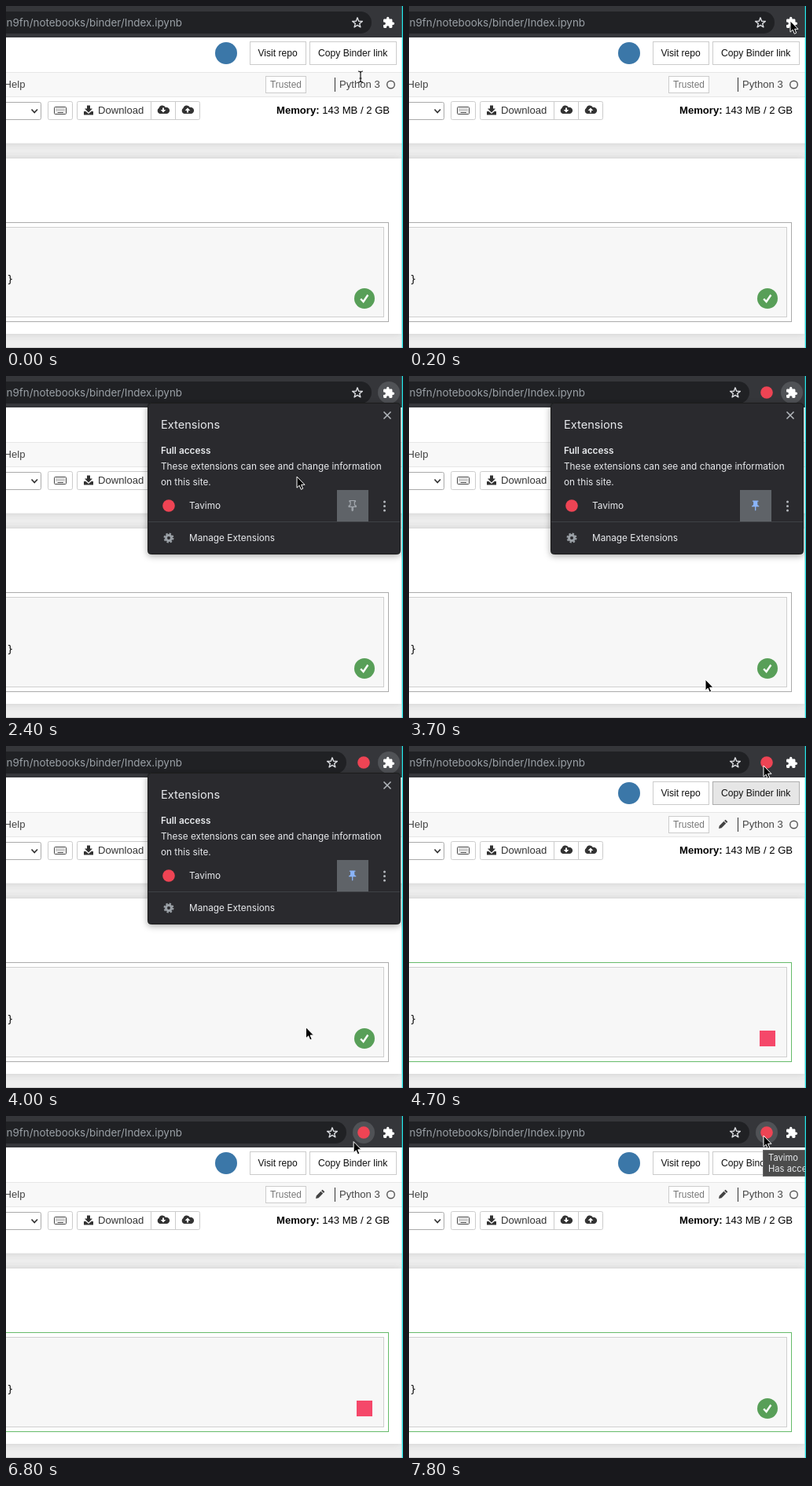
Animation, 505 px wide and 435 px high, one loop 8000 ms. Source, as an HTML page:

```html
<!DOCTYPE html>
<html lang="en">
<head>
<meta charset="utf-8">
<title>Pinning a browser extension</title>
<style>
  html, body { margin: 0; width: 100%; height: 100%; overflow: hidden; background: #fff; }
  svg { display: block; width: 505px; height: 435px; }
  text { font-family: "Liberation Sans", Arial, sans-serif; font-size: 13.1px; fill: #111; white-space: pre; }
  .ui { font-family: Inter, sans-serif; font-size: 11.8px; fill: #e8eaed; }
  .btn { fill: #fff; stroke: #ccc; }
  .hover { fill: #e6e6e6; stroke: #adadad; }
</style>
</head>
<body>
<svg viewBox="0 0 505 435" xmlns="http://www.w3.org/2000/svg">
  <defs>
    <filter id="soft" x="-20%" y="-20%" width="140%" height="150%">
      <feDropShadow dx="0" dy="2" stdDeviation="4" flood-color="#000" flood-opacity=".35"/>
    </filter>
    <filter id="glow" x="-5%" y="-10%" width="110%" height="120%">
      <feDropShadow dx="0" dy="0" stdDeviation="5" flood-color="#575757" flood-opacity=".24"/>
    </filter>
    <path id="cloud" d="M-4.5 5A4 4 0 0 1-5.5-2.2A4.6 4.6 0 0 1 3-3A3.7 3.7 0 0 1 5 5Z"/>
  </defs>

  <!-- page -->
  <rect width="505" height="435" fill="#eee"/>
  <rect x="-30" y="194" width="533" height="223" fill="#fff" filter="url(#glow)"/>
  <rect x="-30" y="30" width="570" height="144.500" fill="#fff" filter="url(#glow)"/>
  <path d="M0 434.500H505" stroke="#ccc"/>

  <circle cx="280" cy="60" r="14" fill="#3b77a8"/>
  <rect class="btn" x="310.500" y="45.500" width="71" height="29"/>
  <text x="320.500" y="64" style="font-size:12.1px">Visit repo</text>
  <rect id="copy" class="btn" x="386.500" y="45.500" width="110" height="29"/>
  <text x="397" y="64" style="font-size:12.150px">Copy Binder link</text>

  <rect x="-2" y="84.500" width="510" height="31" fill="#f8f8f8" stroke="#e7e7e7"/>
  <text x="-2.500" y="104" style="fill:#444">Help</text>
  <rect x="330.500" y="89.500" width="51" height="21" fill="#fff" stroke="#ccc"/>
  <text x="336" y="104" style="font-size:11.9px;fill:#777">Trusted</text>
  <g id="pencil" transform="translate(399 100) rotate(45)" fill="#444">
    <path d="M-2-4H2V4L0 7L-2 4ZM-2-5V-6.500Q-2-7-1.500-7H1.500Q2-7 2-6.500V-5Z"/>
  </g>
  <path d="M418.500 91V109" stroke="#333"/>
  <text x="424" y="104" style="fill:#444">Python 3</text>
  <circle cx="489.500" cy="100" r="4.800" fill="none" stroke="#555" stroke-width="1.400"/>

  <rect x="-10" y="122.500" width="54.500" height="22" rx="2" fill="#fff" stroke="#aaa"/>
  <path d="M32.500 131.500L36.200 135.500L40 131.500" fill="none" stroke="#333" stroke-width="1.700"/>
  <g class="btn">
    <rect x="53.500" y="121.500" width="31" height="23" rx="2"/>
    <rect x="90.500" y="121.500" width="156" height="23" rx="2"/>
    <path d="M184.500 122V144M215.500 122V144"/>
  </g>
  <g fill="none" stroke="#444">
    <rect x="61.500" y="128.500" width="15" height="9" rx="1"/>
    <path d="M63.500 131H75M63.500 133H75" stroke-dasharray="1 1"/>
    <path d="M65.500 135.500H73"/>
  </g>
  <g fill="#333">
    <path d="M103 126.500H107V130.500H110L105 135.500L100 130.500H103ZM99 134H101.500L105 137L108.500 134H111V138.500H99Z"/>
    <use href="#cloud" x="200" y="132"/>
    <use href="#cloud" x="231" y="132"/>
    <path d="M199 129.500H201V132H203.300L200 135.500L196.700 132H199ZM230 135.500H232V133H234.300L231 129.500L227.700 133H230Z" fill="#fff"/>
  </g>
  <text x="117" y="137" style="fill:#333">Download</text>
  <text x="344" y="137" style="fill:#000"><tspan font-weight="bold">Memory:</tspan> 143 MB / 2 GB</text>

  <rect id="cell" x="-6" y="275.500" width="492.500" height="126" fill="#fff"/>
  <rect x="-6" y="281.500" width="486.500" height="114" fill="#f7f7f7" stroke="#cfcfcf"/>
  <text x="1.500" y="352" style="font-family:'DejaVu Sans Mono',monospace;font-size:12.600px;fill:#000">}</text>
  <g id="done">
    <circle cx="456" cy="372" r="13" fill="#589f58"/>
    <path d="M451.200 372.500L454.600 376L460.400 367.500" fill="none" stroke="#fff" stroke-width="2.400"/>
  </g>
  <rect id="spin" x="-10" y="-10" width="20" height="20" fill="#f5486a"/>

  <!-- browser bar -->
  <rect width="505" height="40" fill="#35363a"/>
  <rect id="pill" x="-40" y="7" height="28" rx="14" fill="#202124"/>
  <text class="ui" x="224" y="26" text-anchor="end" style="font-size:13.400px;fill:#9aa0a6">n9fn/notebooks/binder/Index.ipynb</text>
  <path id="star" fill="none" stroke="#dadce0" stroke-width="1.400" stroke-linejoin="round"/>
  <circle id="halo" cx="487" cy="21" r="14" fill="#505256"/>
  <path transform="translate(478.700 13.200) scale(.67)" fill="#fff" d="M20.500 11H19V7c0-1.100-.9-2-2-2h-4V3.500a2.500 2.500 0 0 0-5 0V5H4c-1.100 0-2 .9-2 2v3.800h1.500a2.700 2.700 0 0 1 0 5.400H2V20c0 1.100.9 2 2 2h3.800v-1.500a2.700 2.700 0 0 1 5.400 0V22H17c1.100 0 2-.9 2-2v-4h1.500a2.500 2.500 0 0 0 0-5z"/>
  <circle id="ring" cx="455" cy="21" r="14" fill="#505256"/>
  <circle id="badge" cx="455" cy="21" r="7.800" fill="#ee4454"/>

  <!-- extensions menu -->
  <g id="menu">
    <rect x="180.500" y="34.500" width="321" height="192" rx="4" fill="#292a2d" stroke="#1c1d1f" filter="url(#soft)"/>
    <text class="ui" x="197" y="67" style="font-size:14.600px">Extensions</text>
    <path d="M480.500 45.500L489.500 54.500M489.500 45.500L480.500 54.500" stroke="#b5b9be" stroke-width="1.500"/>
    <text class="ui" x="197" y="99" font-weight="600">Full access</text>
    <text class="ui" x="197" y="119">These extensions can see and change information</text>
    <text class="ui" x="197" y="139">on this site.</text>
    <circle cx="207" cy="165" r="7.800" fill="#ee4454"/>
    <text class="ui" x="233" y="169">Tavimo</text>
    <rect id="pinBox" x="421" y="145" width="40" height="40" fill="#5f6368"/>
    <path id="pin" transform="translate(432.900 157.200) scale(.65)" stroke-width="1.800" d="M16 9V4h1a1 1 0 0 0 0-2H7a1 1 0 0 0 0 2h1v5c0 1.700-1.300 3-3 3v2h6v7l1 1 1-1v-7h6v-2c-1.700 0-3-1.300-3-3z"/>
    <g fill="#b5b9be">
      <circle cx="481.500" cy="160" r="1.500"/><circle cx="481.500" cy="165.500" r="1.500"/><circle cx="481.500" cy="171" r="1.500"/>
    </g>
    <path d="M181 185.500H501" stroke="#3f4145"/>
    <g fill="none" stroke="#9aa0a6">
      <circle cx="207" cy="206" r="3.500" stroke-width="3"/>
      <circle cx="207" cy="206" r="5.500" stroke-width="2" stroke-dasharray="2.320 2"/>
    </g>
    <text class="ui" x="233" y="210">Manage Extensions</text>
  </g>

  <g id="tip">
    <rect x="450.500" y="43.500" width="70" height="33" fill="#4b4b4b" stroke="#696969"/>
    <text class="ui" x="457" y="57" style="font-size:11.200px">Tavimo</text>
    <text class="ui" x="457" y="71" style="font-size:11.200px">Has access to this site</text>
  </g>
  <rect x="503.700" width="1.300" height="435" fill="#22dfe2"/>

  <path id="beam" d="M-3-7Q0-7 0-5Q0-7 3-7M0-5V5M-3 7Q0 7 0 5Q0 7 3 7M-1.500 2H1.500" fill="none" stroke="#111" stroke-width="1.200"/>
  <path id="arrow" d="M0 0V14.200L3.200 11.200L5.300 16.300L7.700 15.200L5.600 10.300H10Z" fill="#000" stroke="#fff" stroke-linejoin="round"/>
</svg>
<script>
const LOOP = 8000, STEP = 50;
const el = id => document.getElementById(id);
const show = (id, on) => el(id).style.display = on ? "" : "none";
const put = (id, x, y, turn = 0) =>
  el(id).setAttribute("transform", `translate(${x} ${y}) rotate(${turn})`);

// pointer stops: time, x, y; repeated places are pauses
const path = [
  [0, 451, 90], [100, 470, 50], [200, 485, 19], [1250, 485, 19],
  [1300, 309, 120], [1750, 309, 120], [1800, 385, 138], [1850, 436, 160],
  [2050, 436, 160], [2100, 438, 135], [2150, 438, 135], [2200, 434, 112],
  [2350, 434, 112], [2400, 370, 128], [2500, 370, 128], [2800, 438, 164],
  [3150, 441, 166], [3400, 374, 426], [3550, 374, 426], [3700, 377, 386],
  [3950, 381, 350], [4250, 384, 396], [4350, 384, 396], [4550, 428, 150],
  [4700, 451, 25], [4950, 451, 25], [5400, 463, 14], [5800, 452, 20],
  [6050, 363, 79], [6300, 372, 90], [6500, 412, 66], [6650, 434, 42],
  [7000, 453, 20], [7200, 451, 25], [LOOP, 451, 25]
];

function pointer(t) {
  const i = path.findIndex(p => p[0] > t);
  const [t0, x0, y0] = path[i - 1], [t1, x1, y1] = path[i];
  const k = (t - t0) / (t1 - t0);
  return [x0 + (x1 - x0) * k, y0 + (y1 - y0) * k];
}

function starPath(cx, cy) {
  const pts = Array.from({ length: 10 }, (_, i) => {
    const r = i % 2 ? 2.8 : 6.7, a = i * Math.PI / 5;
    return `${cx + r * Math.sin(a)} ${cy - r * Math.cos(a)}`;
  });
  return `M${pts.join("L")}Z`;
}

function draw(now) {
  const t = Math.floor(now % LOOP / STEP) * STEP;
  const within = (a, b) => t >= a && t < b;
  const [x, y] = pointer(t);
  const pinned = t >= 2900, editing = t >= 4150, busy = within(4400, 7200);

  show("beam", t < STEP);
  show("arrow", t >= STEP && !within(3300, 3450));
  put("beam", x, y);
  put("arrow", x, y);

  show("menu", within(1300, 4150));
  show("halo", within(1300, 4450));
  show("pinBox", t >= 1850);
  el("pin").setAttribute("fill", pinned ? "#8ab4f8" : "none");
  el("pin").setAttribute("stroke", pinned ? "none" : "#a3a8ae");

  show("badge", pinned);
  show("ring", t >= 4800);
  show("tip", t >= 7800);
  el("pill").setAttribute("width", pinned ? 473 : 505);
  el("star").setAttribute("d", starPath(pinned ? 415 : 447, 21.5));

  const overCopy = x > 386 && x < 497 && y > 45 && y < 75;
  const hover = within(4650, 4750) || (t > 5800 && overCopy);
  el("copy").setAttribute("class", hover ? "btn hover" : "btn");

  show("pencil", editing);
  el("cell").setAttribute("stroke", editing ? "#66bb6a" : "#ababab");
  show("done", !busy);
  show("spin", busy);
  put("spin", 456, 372, (t - 4400) * 0.3);
}

const start = performance.now();
function tick() {
  draw(performance.now() - start);
  requestAnimationFrame(tick);
}
tick();
</script>
</body>
</html>
```
